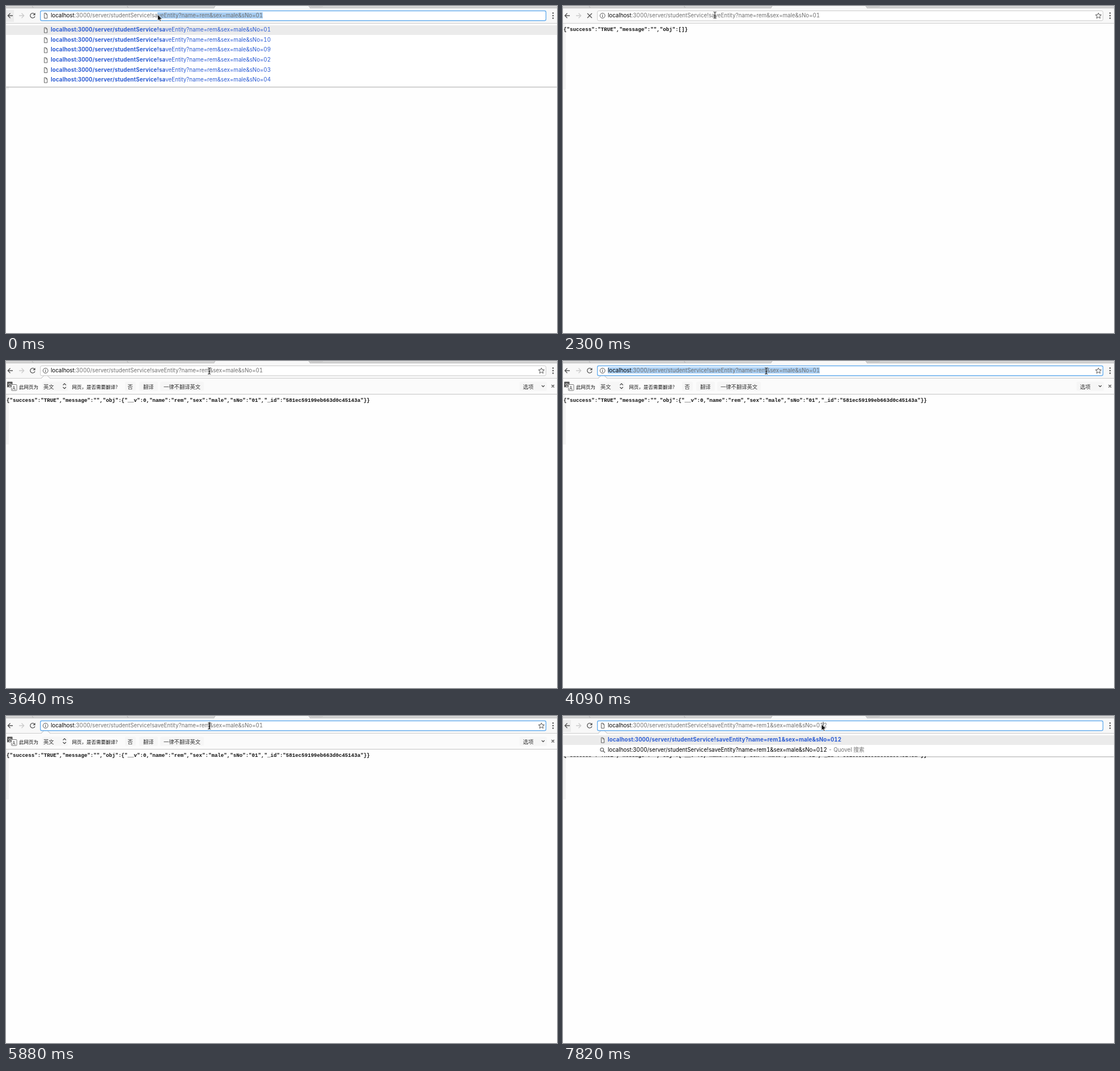
Write an HTML page that moves like this. It is 972 px wide and 576 px high and loops after 8 s.

```html
<!DOCTYPE html>
<html lang="zh-CN">
<head>
<meta charset="utf-8">
<title>Address bar</title>
<style>
html, body { margin: 0; width: 972px; height: 576px; overflow: hidden; background: #fefefe; }
#stage { position: relative; width: 972px; height: 576px; overflow: hidden; font: 9.75px/18px Inter, "Noto Sans CJK SC", "Noto Sans CJK", sans-serif; font-variant-numeric: tabular-nums; color: #707070; }
#stage div, #stage svg, p { position: absolute; }
#stage svg { left: 0; top: 0; }
p { margin: 0; white-space: pre; }
.json { font: 700 9.14px/18px "Liberation Mono", monospace; color: #111; }
.edge { left: 0; top: 31px; width: 5px; height: 116px; background: #f4f4f4; }
.bar { left: 0; top: 30px; width: 972px; overflow: hidden; }
.bar > div { left: 0; bottom: 0; width: 972px; height: 28px; background: #fbfbfb; border-bottom: 1px solid #c4c4c4; }
.cjk { font: 9.3px/18px "Noto Sans CJK SC", "Noto Sans CJK", sans-serif; color: #333; }
.label { font-size: 8.5px; font-weight: 500; color: #111; }
.url b { font-weight: 400; color: #000; }
mark { background: #a9cff4; color: inherit; }
.caret { display: inline-block; width: 0; height: 11px; vertical-align: -2px; box-shadow: 0 0 0 .5px #111; }
.drop { left: 0; top: 30.5px; width: 972px; background: #fff; box-shadow: 0 1px 2px #0005; }
.pick { left: 0; top: 3px; width: 972px; height: 17.5px; background: #ebebeb; }
.link { color: #2a5bd3; }
.link b { letter-spacing: .13px; }
.query { color: #000; }
.query span { color: #707070; }
</style>
</head>
<body>
<div id="stage"></div>
<script>
const stage = document.getElementById('stage');
const LOOP = 8000, HOST = 9;

const address = (name, no) => `localhost:3000/server/studentService!saveEntity?name=${name}&sex=male&sNo=${no}`;
const esc = s => s.replace(/&/g, '&amp;');
const text = (x, y, cls, html) => `<p class="${cls}" style="left:${x}px;top:${y - 9}px">${html}</p>`;
const line = (d, color = '#555', width = 1.2) =>
  `<path d="${d}" fill="none" stroke="${color}" stroke-width="${width}"/>`;
const svg = (body, h = 576) => `<svg width="972" height="${h}">${body}</svg>`;
const pageIcon = y => line(`M67.5 ${y - 4.5}h3l2.2 2.2v6.8h-5.2zM70.3 ${y - 4.5}v2.4h2.4`, '#666', 1);

// Each step changes part of the state and holds until the next one.
// sel: selected range in the address, an empty range is the caret.
const steps = [
  [0, { name: 'rem', no: '01', drop: 'history', typed: 39, sel: [39, 99], focus: true, loading: false, bar: 0, arrow: true, at: [267.5, 15] }],
  [150, { typed: 40, sel: [40, 99] }],
  [360, { typed: 41, sel: [41, 99] }],
  [2300, { drop: '', sel: null, focus: false, loading: true, arrow: false, at: [268, 16] }],
  [2450, { loading: false, bar: 18 }],
  [2600, { bar: 28 }],
  [3050, { at: [344.5, 16.5] }],
  [3200, { at: [293, 13.5] }],
  [3340, { at: [343.5, 14.5] }],
  [3490, { at: [346, 17] }],
  [3640, { at: [358.5, 17.5] }],
  [4090, { focus: true, sel: [0, 99] }],
  [4690, { sel: [56, 56] }],
  [4990, { sel: [57, 57] }],
  [5880, { sel: [56, 56] }],
  [6180, { name: 'rem1', drop: 'search', sel: [57, 57], at: [375.5, 17.5] }],
  [6330, { at: [444.5, 17] }],
  [6480, { at: [453.5, 17] }],
  [6630, { at: [447, 16.5] }],
  [6780, { sel: [71, 71], at: [448.5, 15.5] }],
  [6920, { sel: [72, 72], at: [456, 15] }],
  [7370, { sel: null }],
  [7670, { arrow: true, at: [456, 14.5] }],
  [7820, { no: '012', sel: [73, 73] }]
];
let last = {};
const states = steps.map(([, change]) => last = { ...last, ...change });

function urlHtml(s) {
  const url = address(s.name, s.no), end = url.length;
  const part = (i, j) => `<b>${url.slice(i, Math.min(j, HOST))}</b>${esc(url.slice(Math.max(i, HOST), j))}`;
  if (!s.sel) return part(0, end);
  const [a, b] = s.sel;
  const middle = a === b ? '<i class="caret"></i>' : `<mark>${part(a, b)}</mark>`;
  return part(0, a) + middle + part(b, end);
}

function jsonHtml(s) {
  const obj = s.bar ? '{"__v":0,"name":"rem","sex":"male","sNo":"01","_id":"581ec59199eb663d0c45143a"}' : '[]';
  return text(1, 42 + s.bar, 'json', `{"success":"TRUE","message":"","obj":${obj}}`);
}

function infobar(s) {
  if (!s.bar) return '';
  const buttons = [[64, 45], [210, 19], [235, 33], [272, 77], [906, 48]];
  const icons = svg(
    '<rect x="2" y="6.5" width="9.5" height="10" rx="1" fill="#555"/>' +
    '<rect x="9.5" y="11.5" width="9.5" height="10.5" rx="1" fill="#fff" stroke="#777"/>' +
    buttons.map(([x, w]) => `<rect x="${x}" y="6.5" width="${w}" height="16" rx="2" fill="#f6f6f6"/>`).join('') +
    line('M100.5 12.5l2.7-2.7 2.7 2.7M100.5 16l2.7 2.7 2.7-2.7M945 13l2.5 2.5 2.5-2.5M962.5 12l4.5 4.5m0-4.5l-4.5 4.5', '#444', 1.1), 28);
  const words = [
    [2.7, 11.5, 'cjk', '<span style="font-size:8px;color:#fff">文</span>'],
    [11.2, 17, 'cjk', '<span style="font-size:8.5px">A</span>'],
    [23, 14.5, 'cjk label', '此网页为'], [66, 14.5, 'cjk', '英文'],
    [116.5, 14.5, 'cjk label', '网页，是否需要翻译?'], [214.5, 14.5, 'cjk', '否'],
    [242, 14.5, 'cjk', '翻译'], [278, 14.5, 'cjk', '一律不翻译英文'], [912, 14.5, 'cjk', '选项']
  ];
  return `<div class="bar" style="height:${s.bar + 1}px"><div>${icons}${words.map(w => text(...w)).join('')}</div></div>`;
}

function toolbar(s) {
  const reload = s.loading
    ? line('M43 13l8 8m0-8l-8 8', '#555', 1.4)
    : line('M50.3 14.2a4.2 4.2 0 1 0 .7 4', '#555', 1.3) + '<path d="M51.6 12v4.3h-4.3z" fill="#555"/>';
  const site = s.drop ? pageIcon(17)
    : '<circle cx="69.7" cy="17" r="4.4" fill="none" stroke="#555"/>' + line('M69.7 16.3v3.3M69.7 14.2v1.1', '#555');
  const star = 'M944.5 12l1.5 3.4 3.6.3-2.8 2.4.9 3.6-3.2-2-3.2 2 .9-3.6-2.8-2.4 3.6-.3z';
  return svg(
    '<rect width="972" height="30" fill="#f8f8f8"/><rect width="972" height="4" fill="#d6d6d6"/>' +
    line('M0 3.5H367M537 3.5H972', '#b9b9b9', 1) + line('M46 0l2 3M213.5 0l2 3', '#aaa', .8) +
    '<path d="M366 4.5L369 0H534L537 4.5z" fill="#f8f8f8"/>' + line('M366.5 4L369 0M534 0l3 4', '#aaa', .8) +
    '<path d="M537 0l2 1.2h18l2-1.2z" fill="#e2e2e2" stroke="#b5b5b5" stroke-width=".6"/>' +
    (s.drop ? '<rect y="7" width="14" height="21" fill="#ececec"/>' : '') +
    line('M12 17H3.5M7.5 12.8L3.3 17l4.2 4.2', '#555', 1.3) +
    line('M23 17h8.5M27.5 12.8l4.2 4.2-4.2 4.2', '#ccc', 1.3) + reload +
    line('M0 30.5H972', '#cfcfcf', 1) +
    (s.bar === 28 ? '<path d="M62 31l8-8 8 8z" fill="#fbfbfb"/>' + line('M62 30.5l8-7.5 8 7.5', '#bbb', 1) : '') +
    `<rect x="60.7" y="8.5" width="891.8" height="17.3" rx="2.5" fill="#fff" stroke="${s.focus ? '#6bb0ee' : '#ccc'}" stroke-width="${s.focus ? 1.4 : 1}"/>` +
    site + (s.drop ? '' : line(star, '#555', 1)) +
    [12.5, 17, 21.5].map(y => `<circle cx="965" cy="${y}" r="1.3" fill="#555"/>`).join(''), 32);
}

function dropdown(s) {
  if (!s.drop) return '';
  const rowY = i => 11.6 + i * 17.6;
  const search = s.drop === 'search';
  const nos = search ? [s.no] : ['01', '10', '09', '02', '03', '04'];
  const rows = nos.map((no, i) => {
    const url = address(s.name, no), n = search ? url.length : s.typed;
    return text(79, rowY(i), 'link', `<b>${esc(url.slice(0, n))}</b>${esc(url.slice(n))}`);
  });
  let icons = nos.map((_, i) => pageIcon(rowY(i))).join('');
  if (search) {
    rows.push(text(79, rowY(1), 'query', `${esc(address(s.name, s.no))}<span> - Quovel 搜索</span>`));
    icons += '<circle cx="68.8" cy="28.2" r="2.9" fill="none" stroke="#666" stroke-width="1.2"/>' + line('M71 30.4l3 3', '#666', 1.4);
  }
  const h = search ? 40.5 : 111.5;
  return `<div class="drop" style="height:${h}px"><div class="pick"></div>${svg(icons, h)}${rows.join('')}</div>`;
}

function pointer(s) {
  const shape = s.arrow
    ? '<path d="M0 0V11L2.6 8.7 4.2 12.3 6 11.5 4.5 8H8z" fill="#111" stroke="#fff" stroke-width=".8"/>'
    : line('M-2.5 -5.5Q0 -5.5 0 -4V4Q0 5.5 -2.5 5.5M2.5 -5.5Q0 -5.5 0 -4M0 4Q0 5.5 2.5 5.5M-1.5 1.5h3', '#222', 1.1);
  return svg(`<g transform="translate(${s.at})">${shape}</g>`);
}

let shown = -1;
function frame() {
  const t = performance.now() % LOOP;
  const i = steps.findLastIndex(([start]) => start <= t);
  if (i !== shown) {
    const s = states[shown = i];
    stage.innerHTML = '<div class="edge"></div>' + jsonHtml(s) + infobar(s) + toolbar(s) +
      text(79, 17, 'url', urlHtml(s)) + dropdown(s) + pointer(s);
  }
  requestAnimationFrame(frame);
}
frame();
</script>
</body>
</html>
```
